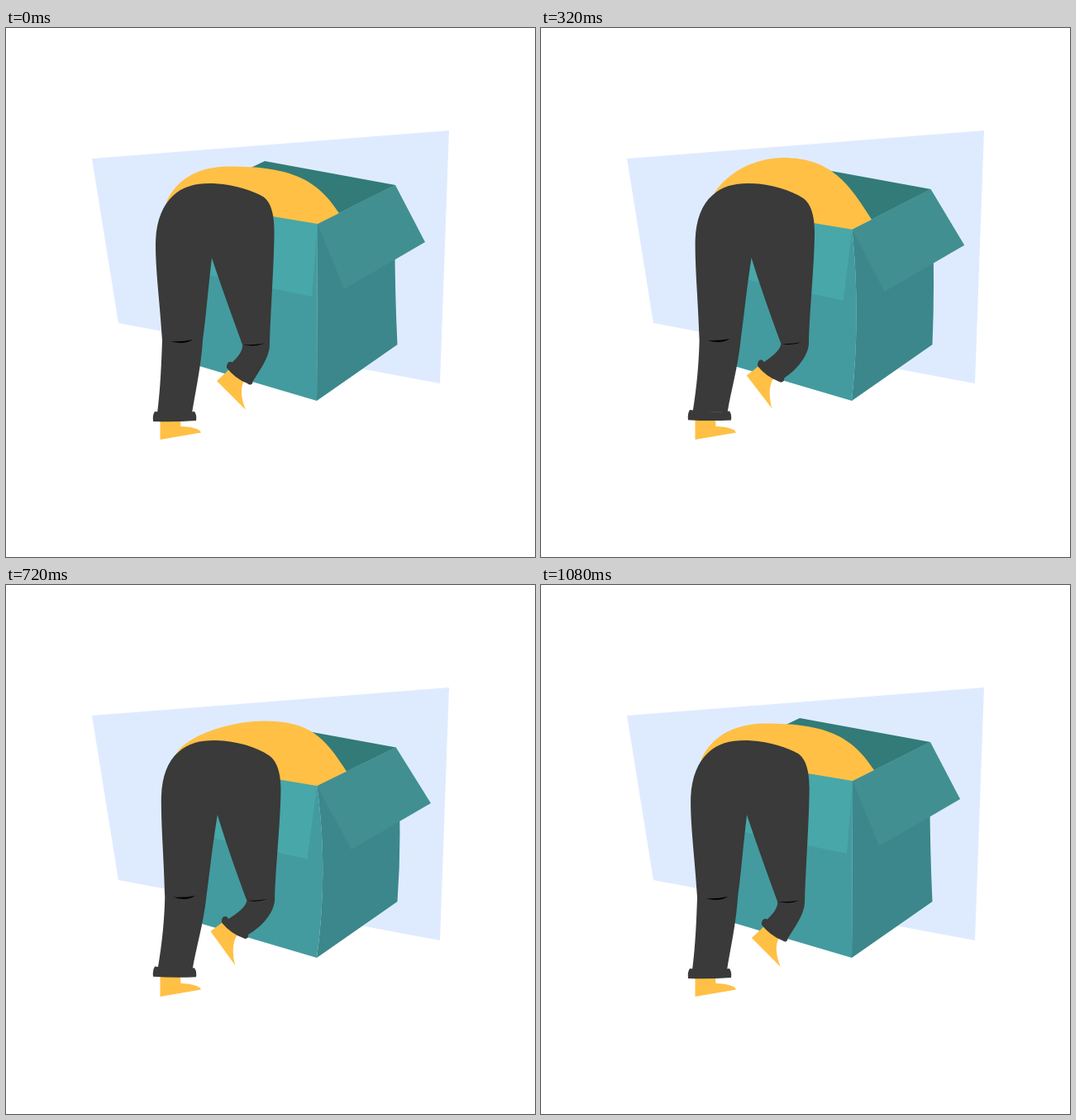
Recreate the animation shown at these times as an HTML page. Size 640 by 640 pixels, loop 1120 ms.

```html
<!DOCTYPE html>
<html lang="en">
<head>
<meta charset="utf-8">
<title>Into the box</title>
<style>
  html, body { margin: 0; width: 100%; height: 100%; overflow: hidden; background: #fff; }
  svg { display: block; width: 100vw; height: 100vh; }
</style>
</head>
<body>
<svg id="stage" viewBox="0 0 640 640"></svg>
<script>
const LOOP = 1120, STEP = 40;
const TEAL = { inside: '#327b78', front: '#439b9f', frontFlap: '#48a7a9', side: '#3b878b', sideFlap: '#418f91' };
const YELLOW = '#ffc045', DARK = '#393a39';

const TIMES = [0, 160, 320, 480, 570, 720, 880, 1080];
const TRACKS = {
  box:    [0, .12, .6, .95, 1, .8, .41, .01],
  legs:   [0, .13, .59, .95, 1, .72, .34, .01],
  corner: [237, 239, 243.8, 245.5, 245.7, 243, 240, 237],
  backX:  [194, 197, 206, 206, 206, 204, 198, 194],
  topX:   [270, 280, 293, 296, 303, 312, 303, 271],
  topY:   [167.5, 165, 157, 161, 163, 164.5, 166, 167.5],
  armX:   [403, 402, 400, 408, 411, 412, 408, 403]
};

// Periodic cubic through the keys, flat at every extreme.
function sample(values, t) {
  const n = TIMES.length;
  const time = i => TIMES[(i + n) % n] + Math.floor(i / n) * LOOP;
  const value = i => values[(i + n) % n];
  const slope = i => (value(i + 1) - value(i)) / (time(i + 1) - time(i));
  const tangent = i => {
    const a = slope(i - 1), b = slope(i);
    return a * b <= 0 ? 0 : 2 * a * b / (a + b);
  };
  let i = n - 1;
  while (TIMES[i] > t) i--;
  const span = time(i + 1) - time(i), u = (t - time(i)) / span;
  const ease = u * u * (3 - 2 * u);
  return value(i) + (value(i + 1) - value(i)) * ease
    + span * u * (1 - u) * ((1 - u) * tangent(i) - u * tangent(i + 1));
}

// Blends the numbers of two paths with the same commands.
function blend(from, to, k) {
  const goal = to.match(/[\d.]+/g);
  let i = 0;
  return from.replace(/[\d.]+/g, v => (+v + (goal[i++] - v) * k).toFixed(2));
}

const poly = (...pts) => 'M' + pts.map(p => p.join(' ')).join('L') + 'Z';

const LEGS = {
  foot: [YELLOW,
    'M255 427L270 413L288 427Q281 440 290 462Z',
    'M244.5 416L259 406L278 420Q267 432 272 459Z'],
  pants: [DARK,
    'M181 262C181 235 189 215 202 203C213 192 229 188 246 188C272 188 297 196 311 204' +
    'C323 212 325 233 324.5 250C324 290 320 345 319 383C319 398 308 412 299 427L272 406' +
    'C281 398 287 390 286 383C284 377 262 318 249 278C244 320 242 350 238 378' +
    'C236 410 229 440 225 466L183 466C187 435 188 405 189 378C186 330 181 295 181 262Z',
    'M190.5 262C190 235 197 213 211 202C223 191 238 188 253 188C280 188 305 196 321 207' +
    'C333 215 336 235 335.5 250C335 290 328 345 327.5 380C327 395 310 415 291 421L265 405' +
    'C279 398 292 389 293.5 381C289 370 270 318 258.5 278C251 320 248 350 244 378' +
    'C240 410 230 440 226 464L184 463C190 430 193 405 193.5 378C193 330 190.5 295 190.5 262Z'],
  raisedCuff: [DARK,
    'M267 409Q268 403 273 404Q285 418 300 423.5L298 430Q296 433 292 430Q277 424 267 411Z',
    'M258.5 405Q259 399 264 400Q276 413 291 419L291 424Q289 428 285 426Q270 421 259 408Z'],
  standingCuff: [DARK,
    'M180 464Q204 467 228 464Q231 468 230 475Q204 477 178 476Q177 468 180 464Z',
    'M180 460.5Q204 465 228 463Q231 467 230 474Q204 475 178 473Q177 465 180 460.5Z'],
  leftKnee: ['#000',
    'M199 379Q212 380 226 377Q215 384 199 379Z',
    'M203 377Q216 378 230 375.5Q219 382.5 203 377Z'],
  rightKnee: ['#000',
    'M286 383Q300 384 313 381.5Q300 386.5 286 383Z',
    'M294 381Q306 382 317 379Q306 384 294 381Z']
};

const stage = document.getElementById('stage');
function addPath(fill, d = '') {
  const path = document.createElementNS('http://www.w3.org/2000/svg', 'path');
  path.setAttribute('fill', fill);
  path.setAttribute('d', d);
  stage.append(path);
  return path;
}

addPath('#deebff', poly([104, 158], [536, 124], [525, 430], [136, 357]));
const parts = {};
for (const name of ['inside', 'front', 'frontFlap', 'side', 'sideFlap']) parts[name] = addPath(TEAL[name]);
parts.shirt = addPath(YELLOW);
addPath(YELLOW, 'M186.5 474L211 474L211.5 482Q234 483 236 489.5L186.5 498Z');
for (const name in LEGS) parts[name] = addPath(LEGS[name][0]);

function boxShapes(k, cornerY) {
  const near = [377 - k, cornerY], far = [471 + k, 190 + 8.2 * k];
  const base = [376, 451], left = [215, cornerY - 29];
  const edge = `Q${376.5 + 17.5 * k} 345 ${near.join(' ')}`;
  return {
    near, far,
    inside: poly([313, far[1] - 29], far, near, left),
    front: `M${left.join(' ')}L215 403.5L${base.join(' ')}${edge}Z`,
    frontFlap: poly(left, near, [370 - 7 * k, 325 + 8 * k], [212, 292 + 7 * k]),
    side: `M${base.join(' ')}${edge}L${far.join(' ')}Q${469 + 14 * k} 290 473.5 383Z`,
    sideFlap: poly(near, far, [507 + 8.7 * k, 259 + 6.2 * k], [409 + 11 * k, 316 + 5 * k])
  };
}

function shirtShape({ backX, topX, topY, armX }, near, far) {
  const backY = 211 - (backX - 194) / 3;
  const armY = near[1] + (far[1] - near[1]) * (armX - near[0]) / (far[0] - near[0]);
  return `M${backX} ${backY}C${backX + 10} ${backY - 24} ${topX - 42} ${topY} ${topX} ${topY}` +
    `C${topX + .55 * (armX - topX)} ${topY} ${armX - 27} ${armY - 42} ${armX} ${armY}` +
    `L${near.join(' ')}L${near[0] - 120} ${near[1] - 20}Z`;
}

function draw(now) {
  const t = Math.floor(now % LOOP / STEP) * STEP;
  const pose = {};
  for (const name in TRACKS) pose[name] = sample(TRACKS[name], t);
  const { near, far, ...shapes } = boxShapes(pose.box, pose.corner);
  shapes.shirt = shirtShape(pose, near, far);
  for (const name in LEGS) shapes[name] = blend(LEGS[name][1], LEGS[name][2], pose.legs);
  for (const name in shapes) parts[name].setAttribute('d', shapes[name]);
}

function tick() {
  draw(performance.now());
  requestAnimationFrame(tick);
}
draw(0);
requestAnimationFrame(tick);
</script>
</body>
</html>
```
